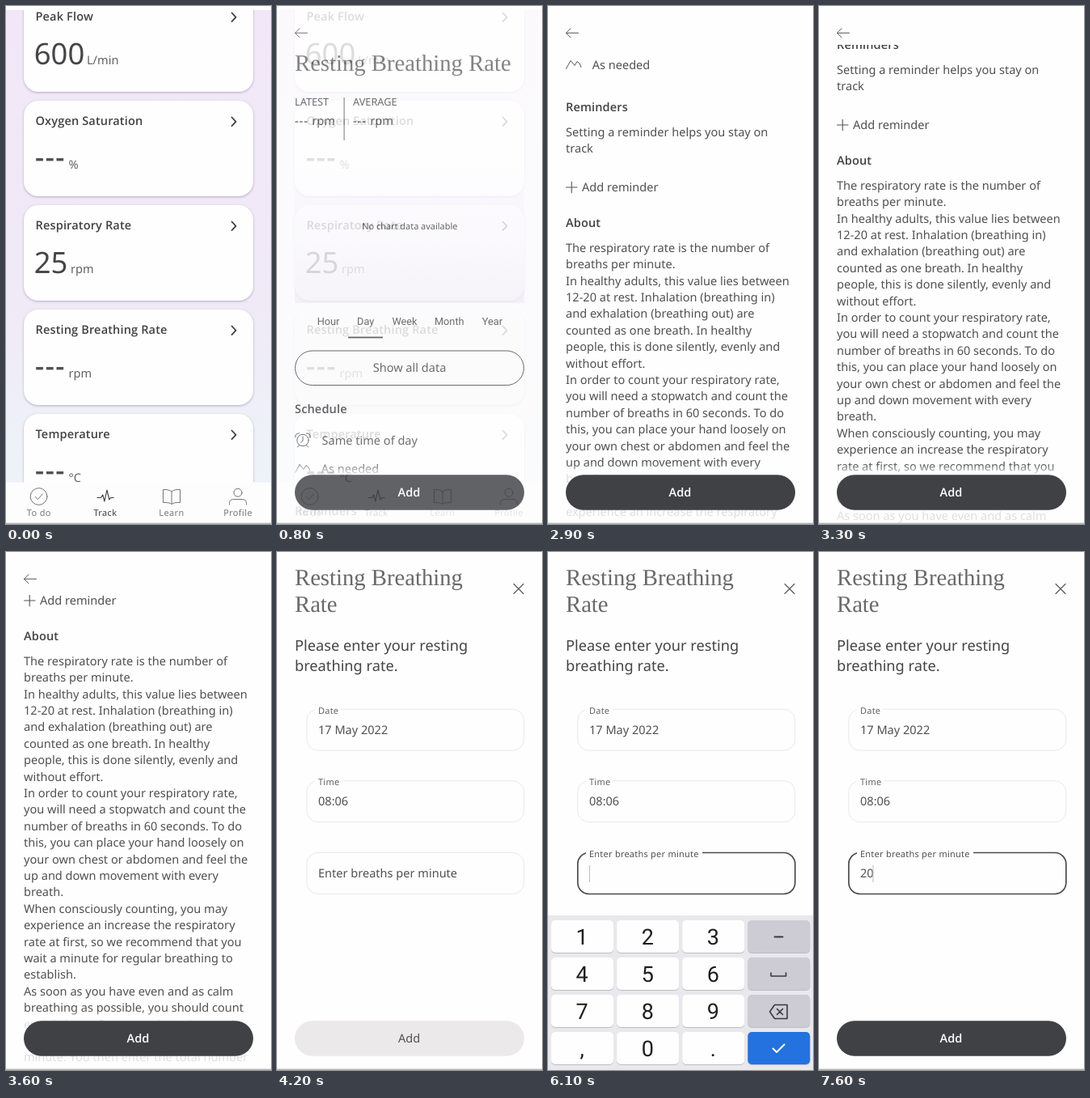
These frames come from a looping animation (328x640 px, 8 s). An HTML page:

```html
<!DOCTYPE html>
<html lang="en">
<head>
<meta charset="utf-8">
<title>Breathing rate tracker</title>
<style>
  html, body { margin: 0; width: 100%; height: 100%; overflow: hidden; background: #fefefe; }
  svg { display: block; width: 328px; height: 640px; }
  text { font: 14.56px "Noto Sans", sans-serif; fill: #505053; white-space: pre; text-rendering: geometricPrecision; }
  .semi { font-family: "Open Sans", "Noto Sans", sans-serif; font-weight: 600; letter-spacing: .14px; fill: #424245; }
  .title { font: 28.7px "Liberation Serif", serif; fill: #69696c; }
  .big { font-size: 36.4px; fill: #454548; }
  .dash { font: 600 34.6px "Open Sans", sans-serif; letter-spacing: 1.5px; }
  .dashes { font: 600 14.56px "Open Sans", sans-serif; letter-spacing: .9px; }
  .unit { fill: #626266; }
  .nav { font-size: 10.93px; letter-spacing: .4px; fill: #77777b; }
  .caps { font-size: 12.75px; }
  .note { font-size: 10.93px; fill: #454548; }
  .tab { font: 12.75px Roboto, sans-serif; }
  .lead { font-size: 18.22px; fill: #454548; }
  .label { font-size: 10.93px; letter-spacing: .27px; fill: #626266; }
  .key { font: 27px Roboto, sans-serif; fill: #1f1f22; }
  .mid { text-anchor: middle; }
  .line { fill: none; stroke: #55555a; stroke-linecap: round; stroke-linejoin: round; }
  .icons .line { stroke: #74747a; }
  .card { fill: #fefefe; filter: drop-shadow(0 1.3px 1.8px rgba(70, 55, 90, .35)); }
</style>
</head>
<body>
<svg id="stage" viewBox="0 0 328 640">
  <defs>
    <linearGradient id="sky" x2="0" y2="1">
      <stop offset="0" stop-color="#f1e7f8"/>
      <stop offset=".55" stop-color="#f0e9f7"/>
      <stop offset=".88" stop-color="#edf2f8"/>
      <stop offset="1" stop-color="#eef4f9"/>
    </linearGradient>
    <linearGradient id="chart" x2="0" y2="1">
      <stop offset="0" stop-color="#fefefe"/>
      <stop offset=".35" stop-color="#fcfafd"/>
      <stop offset="1" stop-color="#f5f2f9"/>
    </linearGradient>
    <linearGradient id="veil" x2="0" y2="1">
      <stop offset="0" stop-color="#fefefe" stop-opacity="0"/>
      <stop offset=".17" stop-color="#fefefe" stop-opacity=".82"/>
      <stop offset="1" stop-color="#fefefe" stop-opacity=".82"/>
    </linearGradient>
    <clipPath id="body"><rect y="48" width="328" height="592"/></clipPath>
  </defs>
</svg>
<script>
const LOOP = 8000, STEP = 100;
const stage = document.getElementById('stage');

const text = (x, y, s, cls = '', more = '') => `<text x="${x}" y="${y}" class="${cls}" ${more}>${s}</text>`;
const rect = (x, y, w, h, fill, r = 0, more = '') =>
  `<rect x="${x}" y="${y}" width="${w}" height="${h}" rx="${r}" fill="${fill}" ${more}/>`;
const line = (d, w = 1, more = '') => `<path class="line" d="${d}" stroke-width="${w}" ${more}/>`;
const group = (id, html, more = '') => `<g id="${id}" ${more}>${html}</g>`;
const lines = (x, y, pitch, rows, cls) => rows.map((s, i) => text(x, y + i * pitch, s, cls)).join('');
const page = rect(0, 0, 328, 640, '#fefefe');
const footLine = rect(0, 638.6, 328, 1.4, '#b4b4b7');
const pill = (fill, more = '') => rect(22, 579.3, 284, 43.4, fill, 21.7, more);

// Overview of measurements
function overview() {
  const cards = [
    ['Peak Flow', '600', 'L/min', 100], ['Oxygen Saturation', '', '%', 77.5],
    ['Respiratory Rate', '25', 'rpm', 80], ['Resting Breathing Rate', '', 'rpm', 77.5],
    ['Temperature', '', '°C', 77.5]
  ].map(([name, value, unit, ux], i) => {
    const y = -12 + i * 129;
    return rect(22, y, 284, 118, '', 18, 'class="card"')
      + text(36.5, y + 30, name, 'semi')
      + line(`M279.5 ${y + 20.5}l5 5.3-5 5.3`, 1.8, 'style="stroke:#404044"')
      + (value ? text(34.8, y + 83.5, value, 'big') : text(36, y + 81.8, '---', 'dash'))
      + text(ux, y + 83.5, unit, 'unit');
  }).join('');
  const tabs = ['To do', 'Track', 'Learn', 'Profile']
    .map((s, i) => text(40.8 + i * 82.1, 630, s, 'nav mid', i === 1 ? 'style="fill:#3f3f42"' : '')).join('');
  const icons = '<circle class="line" cx="40.6" cy="606" r="10.4"/>' + line('M36.2 606.3l3.2 3.3 6-6.8')
    + line('M113 607.5h4.5l2.2-3.5 2.2 8 3-14 3 12 1.7-2.5h3.6', 1.1, 'style="stroke:#3a3a3e"')
    + line('M205 600q-3-3-10.5-2.5v16q7.5-.5 10.5 2 3-2.5 10.5-2v-16q-7.5-.5-10.5 2.5v15.5')
    + '<circle class="line" cx="287" cy="601.2" r="5"/>'
    + line('M276.5 616v-1.500q0-5 5-5h11q5 0 5 5v1.500');
  return rect(0, 0, 328, 640, 'url(#sky)') + cards
    + rect(22, 375, 284, 118, '#55505c', 18, 'id="press" opacity="0"')
    + rect(0, 0, 328, 5, '#fefefe') + rect(0, 588.5, 328, 52, '#fdfdfe')
    + `<g class="icons">${icons}</g>` + tabs + footLine;
}

// Detail page, scrolls below its header
function detail() {
  const about = [
    'The respiratory rate is the number of', 'breaths per minute.',
    'In healthy adults, this value lies between', '12-20 at rest. Inhalation (breathing in)',
    'and exhalation (breathing out) are', 'counted as one breath. In healthy',
    'people, this is done silently, evenly and', 'without effort.',
    'In order to count your respiratory rate,', 'you will need a stopwatch and count the',
    'number of breaths in 60 seconds. To do', 'this, you can place your hand loosely on',
    'your own chest or abdomen and feel the', 'up and down movement with every', 'breath.',
    'When consciously counting, you may', 'experience an increase the respiratory',
    'rate at first, so we recommend that you', 'wait a minute for regular breathing to',
    'establish.', 'As soon as you have even and as calm', 'breathing as possible, you should count',
    'exactly how often your chest rises and', 'falls within the course of one whole',
    'minute. You then enter the total number', 'of breaths you have counted.'
  ];
  const tabs = [['Hour', 63.5], ['Day', 109.7], ['Week', 158], ['Month', 213.3], ['Year', 266.5]]
    .map(([s, x]) => text(x, 394, s, 'tab mid')).join('');
  const content = text(22, 79.5, 'Resting Breathing Rate', 'title')
    + text(22, 123, 'LATEST', 'caps') + text(94, 123, 'AVERAGE', 'caps')
    + [22, 94].map(x => text(x, 147.3, '---', 'dashes') + text(x + 21.2, 147.3, 'rpm')).join('')
    + rect(82.6, 113, 1, 53, '#5c5c60')
    + rect(22, 195, 284, 172, 'url(#chart)')
    + text(164.3, 276, 'No chart data available', 'note mid')
    + tabs + rect(88, 408.6, 43, 1.8, '#48484c')
    + rect(22.5, 426, 283, 42.5, 'none', 21.2, 'stroke="#4b4b4f"') + text(164, 452, 'Show all data', 'mid')
    + text(22, 503, 'Schedule', 'semi')
    + '<circle class="line" cx="32" cy="536.5" r="7.2"/>'
    + line('M32 532v5l-2.5 2.5M27.5 542.5l-2 2.5M36.5 542.5l2 2.5M23 533q-1.5-5 4.5-5M41 533q1.5-5-4.5-5')
    + text(55.5, 541.5, 'Same time of day')
    + line('M22.5 576.5l5.5-10 5 6 3-5q3.5 1 5 7')
    + text(54.7, 576.5, 'As needed')
    + text(22, 629, 'Reminders', 'semi')
    + lines(22, 659.5, 20.4, ['Setting a reminder helps you stay on', 'track'])
    + line('M22.5 723h13.5M29.2 716.2v13.5', 1.1) + text(42, 728, 'Add reminder')
    + text(22, 772, 'About', 'semi') + lines(22, 802.8, 20.4, about);
  return page + `<g clip-path="url(#body)">${group('scroll', content)}</g>`
    + rect(0, 566, 328, 74, 'url(#veil)')
    + line('M37.5 33.3h-15M28 27.8l-5.7 5.5 5.7 5.5')
    + pill('#404145', 'id="open"') + text(163.5, 606, 'Add', 'semi mid', 'style="fill:#fff"') + footLine;
}

// Entry form
function form() {
  const box = (y, more = '') => rect(36.8, y, 269, 51, '#fefefe', 14, `stroke="#e9e9ec" ${more}`);
  const field = (y, w, name, value) => box(y) + rect(47, y - 3, w, 6, '#fefefe')
    + text(51, y + 5.5, name, 'label') + text(51, y + 30.3, value);
  return page + lines(22, 41.2, 32.4, ['Resting Breathing', 'Rate'], 'title')
    + line('M293 39.5l12 12m0-12l-12 12', 1.1)
    + lines(22, 121.5, 25.2, ['Please enter your resting', 'breathing rate.'], 'lead')
    + field(194.2, 32, 'Date', '17 May 2022') + field(282.7, 34, 'Time', '08:06')
    + box(371.5, 'id="entry"') + rect(47, 368, 144, 6, '#fefefe', 0, 'id="gap"')
    + text(51, 0, 'Enter breaths per minute', '', 'id="hint"')
    + text(51, 401.8, '', '', 'id="value"') + rect(51, 387, 1, 21, '#bcbcc0', 0, 'id="caret"')
    + pill('#ebe9ea', 'id="save"') + text(163.5, 606, 'Add', 'mid', 'id="saveText"') + footLine;
}

function keyboard() {
  const faces = ['1', '2', '3', '', '4', '5', '6', '', '7', '8', '9', '', ',', '0', '.', ''];
  const keys = faces.map((s, i) => {
    const x = 4 + i % 4 * 81.1, y = 455 + (i >> 2) * 46;
    const fill = i === 15 ? '#2472df' : i % 4 === 3 ? '#cdccd5' : '#fefefe';
    return rect(x, y + 1, 77, 40, '#bcbcc3', 5) + rect(x, y, 77, 40, fill, 5, `id="key${s || 'x' + i}"`)
      + text(x + 38.2, y + 30, s, 'key mid');
  }).join('');
  const dark = 'style="stroke:#38383d"';
  return rect(0, 449, 328, 191, '#e8e8ed') + keys
    + line('M280.5 475.5h10', 1.8, dark) + line('M276 520v4h18.5v-4', 1.6, dark)
    + line('M280.5 559.5h15.5v17h-15.5l-6-8.5zM283.5 564.5l7 7m0-7l-7 7', 1.6, dark)
    + line('M278.5 613.5l4.5 4.5 9.5-9.5', 2, 'style="stroke:#fff"');
}

stage.insertAdjacentHTML('beforeend', group('overview', overview()) + group('detail', detail())
  + group('form', form()) + group('keyboard', keyboard()));

const el = id => document.getElementById(id);
const set = (id, attrs) => { for (const k in attrs) el(id).setAttribute(k, attrs[k]); };
const show = (id, a) => set(id, { opacity: a, visibility: a > 0 ? 'visible' : 'hidden' });
const within = (t, ...spans) => spans.some(([a, b]) => t >= a && t < b);

// Times in ms with values, linear in between
const track = {
  press: [[400, 0], [500, .06], [700, .1], [1000, 0]],
  detail: [[500, 0], [600, .15], [700, .5], [800, .82], [900, .95], [1000, 1]],
  scroll: [[2300, 0], [2400, 45], [2600, 260], [2800, 439], [2900, 499], [3000, 535], [3100, 554], [3200, 562],
    [3250, 562], [3300, 576], [3400, 612], [3500, 645], [3600, 663], [3700, 670]],
  form: [[3700, 0], [3800, .12], [3900, .5], [4000, .82], [4100, .96], [4200, 1]],
  float: [[5000, 0], [5100, .4], [5200, 1]],
  drop: [[5000, 191], [5100, 175], [5200, 95], [5300, 25], [5400, 0], [7100, 0], [7200, 50], [7300, 140], [7400, 191]]
};

function at(name, t) {
  const keys = track[name], i = keys.findIndex(k => k[0] > t);
  if (i < 0) return keys[keys.length - 1][1];
  if (!i) return keys[0][1];
  const [a, u] = keys[i - 1], [b, v] = keys[i];
  return u + (v - u) * (t - a) / (b - a);
}

function draw(t) {
  show('press', at('press', t));
  show('detail', at('detail', t));
  show('form', at('form', t));
  set('scroll', { transform: `translate(0 ${-at('scroll', t)})` });
  set('open', { fill: within(t, [3700, 4200]) ? '#58595d' : '#404145' });

  const p = at('float', t), focus = t >= 5100;
  set('entry', { stroke: focus ? '#4a4a4e' : '#e9e9ec', 'stroke-width': focus ? 1.7 : 1 });
  show('gap', p);
  set('hint', { y: 402 - 25.2 * p, style: `font-size:${14.56 - 3.63 * p}px;letter-spacing:${.27 * p}px` });

  const value = t < 6400 ? '' : t < 6600 ? '2' : '20';
  el('value').textContent = value;
  set('caret', { x: 51 + value.length * 7.75 });
  show('caret', +within(t, [5200, 5600], [6100, 7200], [7600, LOOP]));

  const ready = value !== '';
  set('save', { fill: ready ? '#404145' : '#ebe9ea' });
  set('saveText', { class: ready ? 'semi mid' : 'mid', style: ready ? 'fill:#fff' : '' });

  const drop = at('drop', t);
  show('keyboard', +(drop < 191));
  set('keyboard', { transform: `translate(0 ${drop})` });
  set('key2', { fill: within(t, [6300, 6400]) ? '#d9d9df' : '#fefefe' });
  set('key0', { fill: within(t, [6500, 6600]) ? '#d9d9df' : '#fefefe' });
}

const start = performance.now();
function tick() {
  const t = (performance.now() - start) % LOOP;
  draw(Math.floor(t / STEP) * STEP);
  requestAnimationFrame(tick);
}
tick();
</script>
</body>
</html>
```
